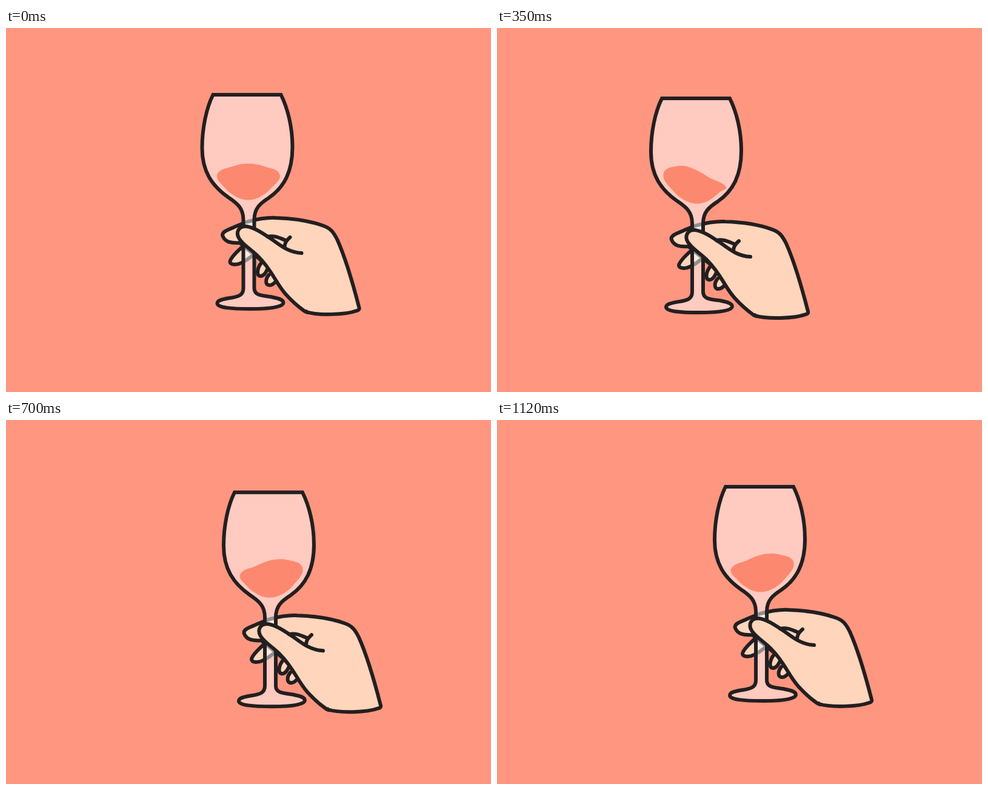
An HTML page that plays this animation: 800 px wide and 600 px high, repeating every 1.19 s.

```html
<!DOCTYPE html>
<html lang="en">
<head>
<meta charset="utf-8">
<title>Swirling wine</title>
<style>
  html, body { margin: 0; height: 100%; overflow: hidden; background: #ff9680; }
  svg { display: block; width: 800px; height: 600px; }
  .line { stroke: #231f20; stroke-width: 6; stroke-linecap: round; }
  .hand { fill: #ffd5bc; stroke-linejoin: round; }
  .none { fill: none; }
</style>
</head>
<body>
<svg viewBox="0 0 800 600">
  <g id="scene">
    <!-- fingers and palm behind the stem -->
    <g class="line hand">
      <path d="M434 407C428 414 428 424 435 424C440 424 444 420 447 416"/>
      <path d="M421 388C415 396 413 408 420 409C426 409 429 403 432 397"/>
      <path d="M390 361C380 370 371 379 370 385C370 391 382 391 389 387C398 383 405 377 412 371"/>
      <path d="M386 354C372 355 362 353 358 343C356 338 361 335 368 332C380 327 390 322 400 319C415 315 430 312 446 313C475 314 505 319 524 326C536 330 541 337 547 349C560 378 574 426 583 461Q584 465 579 466C560 473 515 474 496 468L430 390Z"/>
    </g>

    <path class="line" fill="#fff" fill-opacity=".5" d="M342 110C331 132 324 165 324 198C324 236 340 260 367 279C382 289 392 297 392 316V429C392 441 383 443 370 445C357 447 349 449 349 454C349 461 372 463 404 463C436 463 458 460 458 453C458 447 447 445 437 443C420 441 410 440 410 429V316C410 297 420 289 434 280C460 262 473 236 473 196C473 163 465 132 454 110Z"/>
    <path id="wine" fill="#fc896f"/>

    <!-- thumb in front of the stem -->
    <g class="line hand">
      <path stroke="none" d="M488 371C470 370 455 360 440 348C425 339 411 329 397 327C384 326 379 337 385 347C392 358 405 365 417 377C440 400 445 420 462 439C472 450 482 459 492 466L540 440Z"/>
      <path class="none" d="M488 371C468 370 455 360 440 349C425 339 411 329 397 327C384 326 379 337 385 347C392 358 405 365 417 377C440 400 445 420 462 439C472 450 482 459 492 466Q494 468 499 469"/>
      <path class="none" d="M432 344C444 341 453 347 462 350M469 345C462 351 460 355 460 362"/>
    </g>
  </g>
</svg>
<script>
const STEP = 70, COUNT = 17, HALF = 9, LOWEST = 9.5;
const scene = document.getElementById('scene');
const wine = document.getElementById('wine');

// Sideways swing: fast through the middle, slow at the ends
function swing(k) {
  const side = k < HALF ? -1 : 1;
  const d = Math.min(Math.abs(k - HALF), k < HALF ? k : COUNT - k);
  return side * 75.5 * (1 - .53 ** d) - .5;
}

// The hand sinks on the left swing and rises again on the right one
function sink(k) {
  if (k < HALF) return LOWEST * (k / HALF) ** .75;
  return LOWEST * Math.cos(Math.PI / 2 * Math.min(1, (k - HALF) / 7));
}

// Outline of the wine; tilt runs from -1 (high on the left) to 1
function wineOutline(tilt) {
  const points = [];
  for (let s = -1; s <= 1; s += .5) {
    const wave = 11 * Math.sin(2 * s) + 3;
    points.push([400.5 + 51.5 * s + 4 * tilt, 241.5 - 18 * (1 - s * s) - tilt * wave]);
  }
  for (let x = 38; x >= -38; x -= 19) points.push([400 + x, 283.5 - .0135 * x * x]);
  return points;
}

// Smooth closed curve through points
function blob(points) {
  const n = points.length;
  const at = i => points[(i + n) % n];
  const tangent = i => {
    const [ax, ay] = at(i - 1), [bx, by] = at(i + 1);
    const len = Math.hypot(bx - ax, by - ay);
    return [(bx - ax) / len, (by - ay) / len];
  };
  let d = 'M' + at(0);
  for (let i = 0; i < n; i++) {
    const [x, y] = at(i), [X, Y] = at(i + 1);
    const [ux, uy] = tangent(i), [vx, vy] = tangent(i + 1);
    const r = Math.hypot(X - x, Y - y) * .35;
    d += `C${x + ux * r},${y + uy * r} ${X - vx * r},${Y - vy * r} ${X},${Y}`;
  }
  return d + 'Z';
}

const start = performance.now();
function draw(now) {
  const k = Math.floor(Math.max(0, now - start) / STEP) % COUNT;
  const dx = swing(k);
  scene.setAttribute('transform', `translate(${dx} ${sink(k)})`);
  wine.setAttribute('d', blob(wineOutline(dx / 64)));
  requestAnimationFrame(draw);
}
draw(start);
</script>
</body>
</html>
```
